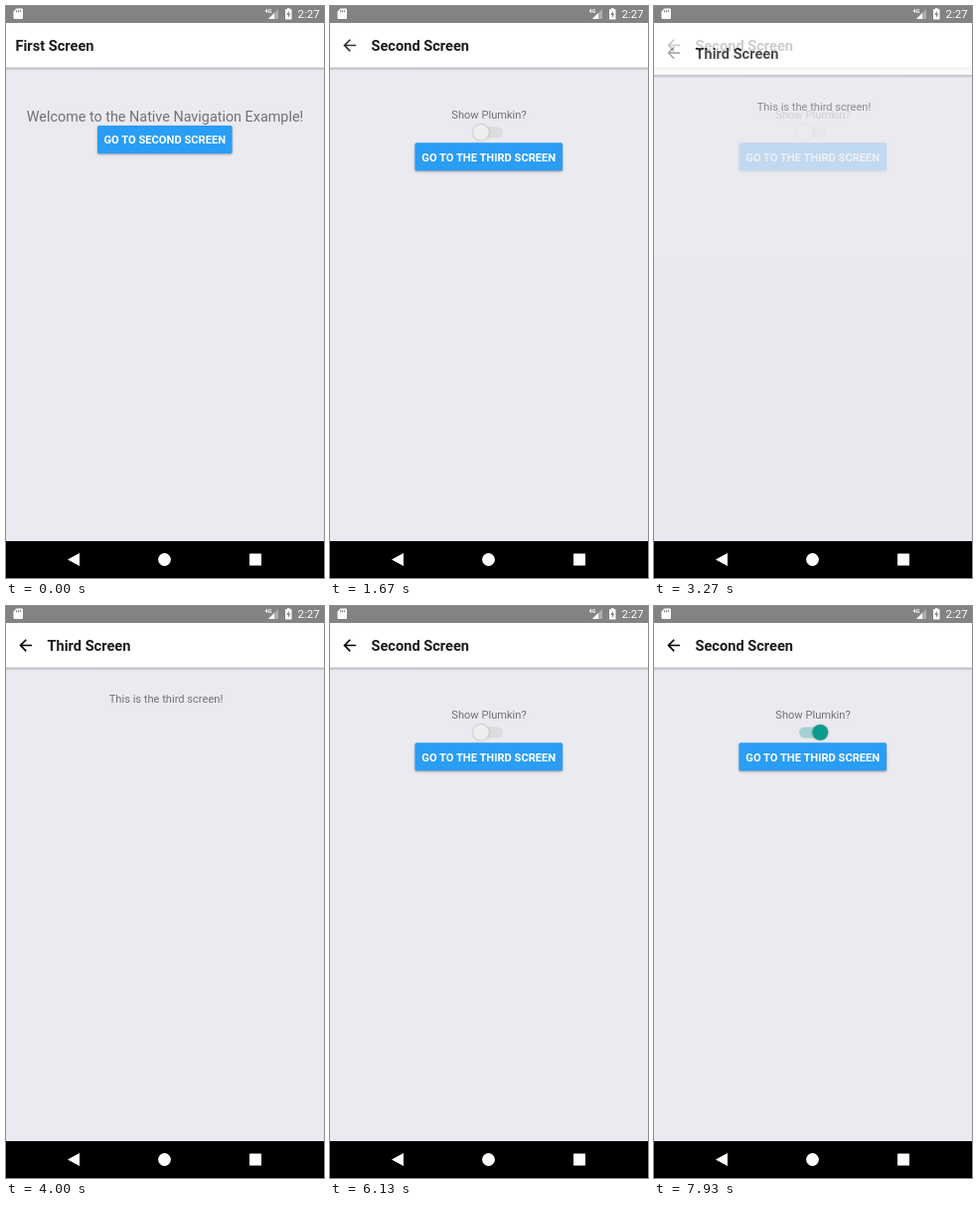
Recreate the animation shown at these times as an HTML page. Size 320 px wide and 574 px high, loop 8 s.

```html
<!DOCTYPE html>
<html lang="en">
<head>
<meta charset="utf-8">
<title>Screen navigation</title>
<style>
html, body { margin: 0; width: 100%; height: 100%; overflow: hidden; background: #ebeaf0; }
body > svg { display: block; width: 320px; height: 574px; }
text { font-family: Roboto, sans-serif; font-size: 11.1px; fill: #727274; }
.mid { text-anchor: middle; }
.title { font-size: 14.6px; font-weight: 700; fill: #1b1b1b; }
.label { font-size: 11.15px; font-weight: 700; fill: #fff; text-anchor: middle; }
.button { fill: #2a9df4; filter: drop-shadow(0 1px 1px rgba(0, 0, 0, .36)); }
.thumb { filter: drop-shadow(0 .8px .8px rgba(0, 0, 0, .3)); }
</style>
</head>
<body>
<svg viewBox="0 0 320 574">
  <defs>
    <linearGradient id="shade" x2="0" y2="1">
      <stop stop-opacity=".26"/>
      <stop offset="1" stop-opacity="0"/>
    </linearGradient>
    <g id="page">
      <rect y="17" width="320" height="557" fill="#ebeaf0"/>
      <rect y="61.5" width="320" height="3.5" fill="url(#shade)"/>
      <rect y="17" width="320" height="44.5" fill="#fff"/>
    </g>
    <path id="arrow" transform="translate(10.2 30) scale(.795)"
      d="M20 11H7.83l5.59-5.59L12 4l-8 8 8 8 1.41-1.41L7.83 13H20z"/>
  </defs>

  <g id="first">
    <use href="#page"/>
    <text class="title" x="9.5" y="45.2">First Screen</text>
    <text class="mid" x="160" y="116" style="font-size:14.38px">Welcome to the Native Navigation Example!</text>
    <rect class="button" x="92" y="120" width="135.5" height="28" rx="1.6"/>
    <svg x="92" y="120" width="135.5" height="28"><circle id="press1" cx="68" cy="14"/></svg>
    <text class="label" x="159.8" y="138.4">GO TO SECOND SCREEN</text>
  </g>

  <g id="second">
    <use href="#page"/>
    <use id="arrow2" href="#arrow"/>
    <text class="title" x="41.5" y="45.2">Second Screen</text>
    <text class="mid" x="160" y="113">Show Plumkin?</text>
    <rect id="track" x="146" y="121.5" width="28" height="11" rx="5.5"/>
    <circle id="halo" cy="127" fill="#009688"/>
    <circle id="thumb" class="thumb" cy="126.8" r="7.9"/>
    <rect class="button" x="85.5" y="137.3" width="148.5" height="28" rx="1.6"/>
    <svg x="85.5" y="137.3" width="148.5" height="28"><circle id="press2" cx="74" cy="14"/></svg>
    <text class="label" x="159.8" y="155.8">GO TO THE THIRD SCREEN</text>
  </g>

  <g id="third">
    <use href="#page"/>
    <svg y="17" width="320" height="44.5"><circle id="tap" cx="19.8" cy="22.5"/></svg>
    <use id="arrow3" href="#arrow"/>
    <text class="title" x="41.5" y="45.2">Third Screen</text>
    <text class="mid" x="161" y="97.3">This is the third screen!</text>
  </g>

  <rect width="320" height="17" fill="#838383"/>
  <g fill="#fff">
    <path d="M10.5 2.5H16q1 0 1 1V12q0 1-1 1H8.500q-1 0-1-1V5.500z"/>
    <path d="M10.700 4v2.300M12.700 4v2.300M14.700 4v2.300" stroke="#838383"/>
    <text x="260.500" y="7" style="font-size:5.500px;font-weight:700;fill:#fff">4G</text>
    <path d="M274 3V13H264z" opacity=".35"/>
    <path d="M270 7V13H264z"/>
    <path d="M283 2h2.500v1.200H287.500V13.500H281V3.200h2z"/>
    <path d="M284.800 4.800L282.300 8.900H284V12L286.300 7.800H284.800z" fill="#838383"/>
    <text x="293.600" y="12.400" style="font-size:11.400px;fill:#fff">2:27</text>
  </g>

  <rect y="537" width="320" height="37" fill="#000"/>
  <g fill="#fff">
    <path d="M62 555.500L74 549V562z"/>
    <circle cx="159.500" cy="555.500" r="6.400"/>
    <rect x="245" y="549.500" width="12" height="12" rx=".6"/>
  </g>
</svg>
<script>
const LOOP = 8000, SLIDE = 46;
const OPEN2 = 895, OPEN3 = 3165, CLOSE3 = 5420;
const el = id => document.getElementById(id);
const set = (id, attrs) => {
  for (const k in attrs) el(id).setAttribute(k, attrs[k]);
};
const ramp = (t, from, length) => Math.min(1, Math.max(0, (t - from) / length));
const mix = (a, b, k) => a + (b - a) * k;
const blend = (a, b, k) => `rgb(${a.map((v, i) => Math.round(mix(v, b[i], k)))})`;
const easeOut = (k, power) => 1 - (1 - k) ** power;

function place(id, y, opacity) {
  set(id, { transform: `translate(0 ${y})`, opacity, display: opacity > 0 ? "inline" : "none" });
}

// Slides up while fading in; the first moments stay hidden while the screen loads.
function enter(id, t, start) {
  const y = SLIDE * (1 - easeOut(ramp(t, start, 350), 5));
  place(id, y, t < start + 95 ? 0 : easeOut(ramp(t, start, 200), 2));
}

function press(id, t, start) {
  const k = ramp(t, start, 300);
  set(id, { r: 80 * easeOut(k, 2), opacity: .13 * Math.sin(Math.PI * k) });
}

function draw(t) {
  press("press1", t, 440);
  press("press2", t, 2900);

  enter("second", t, OPEN2);
  set("arrow2", { opacity: ramp(t, OPEN2, 960) });

  if (t < CLOSE3) enter("third", t, OPEN3);
  else place("third", SLIDE * ramp(t, CLOSE3, 250) ** 5, 1 - ramp(t, CLOSE3 + 100, 150));
  set("arrow3", { opacity: ramp(t, OPEN3, 250) });

  const tap = ramp(t, 4900, 350);
  set("tap", { r: 31 * easeOut(tap, 2), opacity: .2 * Math.min(1, tap * 2) });

  const k = ramp(t, 7300, 250), on = k * k * (3 - 2 * k);
  const x = mix(152, 167.3, on);
  set("track", { fill: blend([220, 219, 223], [165, 208, 211], on) });
  set("thumb", { cx: x, fill: blend([238, 238, 238], [12, 155, 141], on) });
  set("halo", { cx: x, r: 15 * easeOut(ramp(t, 7130, 200), 2), opacity: .16 * (1 - ramp(t, 7330, 180)) });
}

function tick(now) {
  draw(now % LOOP);
  requestAnimationFrame(tick);
}
draw(0);
requestAnimationFrame(tick);
</script>
</body>
</html>
```
